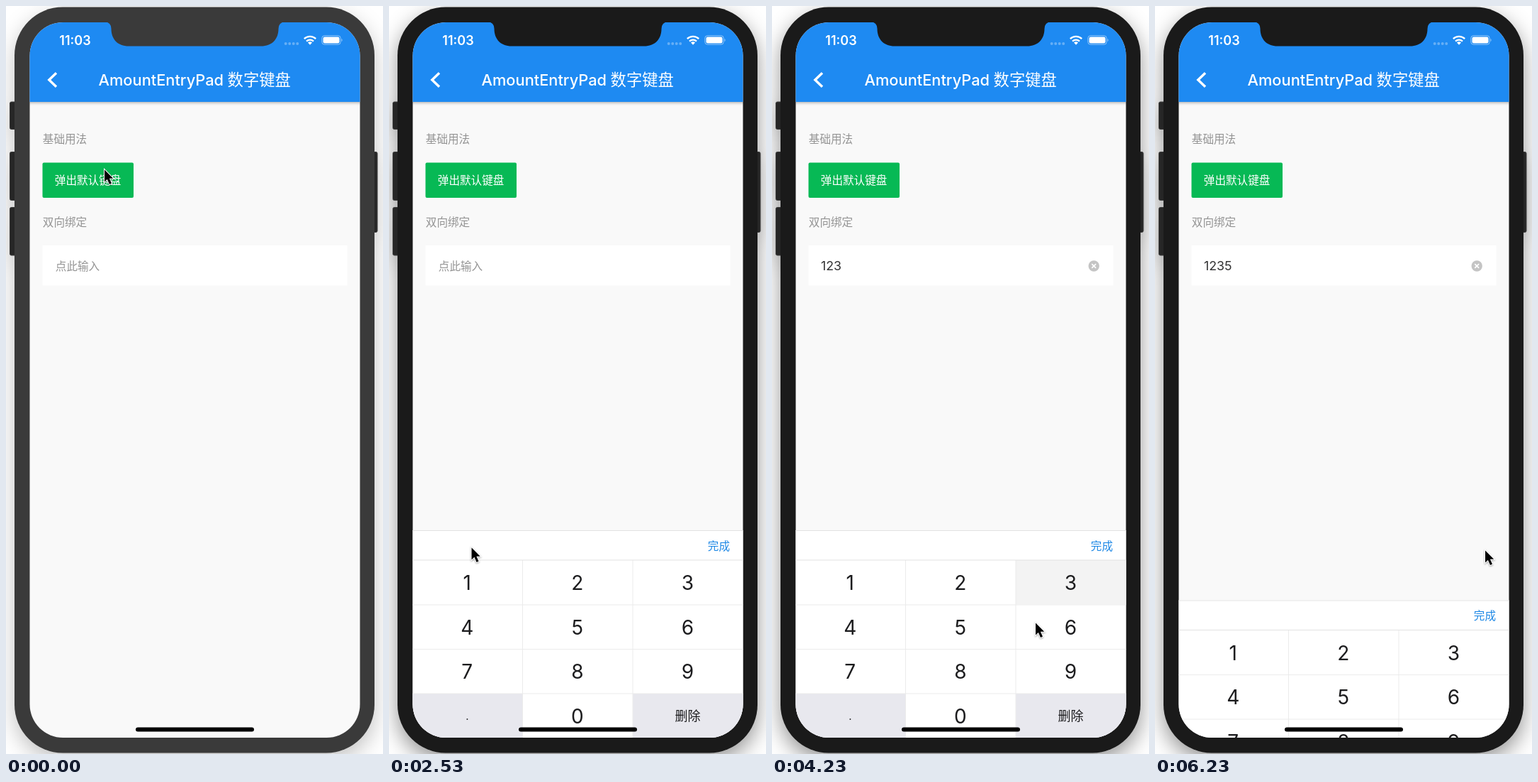
An HTML page that plays this animation: 532x1053 px, repeating every 6.26 s.

```html
<!DOCTYPE html>
<html lang="zh-CN">
<head>
<meta charset="utf-8">
<title>Number pad demo</title>
<style>
  html, body { margin: 0; width: 100%; height: 100%; overflow: hidden; background: #fff; }
  svg { display: block; width: 532px; height: 1053px; }
  text { font-family: Inter, "Noto Sans CJK SC", "Noto Sans CJK", sans-serif; }
  #phone { --body: #3a3a3a; --shade: rgba(0, 0, 0, .24); }
  #phone.active { --body: #1a1a1a; --shade: rgba(0, 0, 0, .42); }
  #shell { filter: drop-shadow(0 11px 15px var(--shade)); }
  .body { fill: var(--body); }
  .side { fill: #262626; stroke: #3c3c3c; }
  .bar { fill: #1e8af2; filter: drop-shadow(0 1px 2px rgba(0, 0, 0, .35)); }
  .cn { font-size: 15.6px; }
  .gray { fill: #939393; }
  .digit { font-size: 28px; fill: #1c1c1e; text-anchor: middle; }
  .line { stroke: #ebebeb; fill: none; }
  #cursor { filter: drop-shadow(0 1.5px 1.2px rgba(0, 0, 0, .35)); }
</style>
</head>
<body>
<svg viewBox="0 0 532 1053" xmlns="http://www.w3.org/2000/svg">
  <defs>
    <clipPath id="screen"><rect x="33.5" y="23" width="466" height="1007" rx="47"/></clipPath>
  </defs>
  <g id="phone">
    <g id="shell">
      <g class="side">
        <rect x="5.5" y="135" width="9" height="38.5" rx="2"/>
        <rect x="5.5" y="205.5" width="9" height="68" rx="2"/>
        <rect x="5.5" y="283.5" width="9" height="67.5" rx="2"/>
        <rect x="516" y="205.5" width="8" height="113" rx="2"/>
      </g>
      <rect class="body" x="12" y="1.5" width="508" height="1050" rx="68"/>
    </g>

    <g clip-path="url(#screen)">
      <rect x="33" y="23" width="467" height="1008" fill="#f9f9f9"/>
      <rect class="bar" x="28" y="18" width="477" height="117"/>

      <g fill="#fff">
        <text x="97.5" y="54.5" font-size="18" font-weight="600" text-anchor="middle">11:03</text>
        <g opacity=".32">
          <circle cx="394.7" cy="53" r="2"/><circle cx="400.2" cy="53" r="2"/>
          <circle cx="405.7" cy="53" r="2"/><circle cx="411.2" cy="53" r="2"/>
        </g>
        <path d="M429 54.8l-3-3.2a4.4 4.4 0 0 1 6 0z"/>
        <g fill="none" stroke="#fff" stroke-width="2.3">
          <path d="M424 49.7a7.3 7.3 0 0 1 10 0"/>
          <path d="M420.8 46.2a11.8 11.8 0 0 1 16.4 0"/>
        </g>
        <rect x="445.8" y="41.8" width="26.4" height="12.4" rx="3.6" fill="none" stroke="#fff" stroke-opacity=".5"/>
        <rect x="447.5" y="43.5" width="23" height="9" rx="2.2"/>
        <path d="M473.5 46a2.3 2.3 0 0 1 0 4z" opacity=".5"/>
        <path d="M71 94.2L60.8 104 71 113.8" fill="none" stroke="#fff" stroke-width="3.4"/>
        <g font-size="21.8" font-weight="500">
          <text x="307" y="111.5" text-anchor="end">AmountEntryPad</text>
          <text x="312.6" y="112" font-size="22.3">数字键盘</text>
        </g>
      </g>

      <g class="cn">
        <text class="gray" x="51.8" y="193">基础用法</text>
        <rect x="51.5" y="220.5" width="128.5" height="49.5" rx="2" fill="#07b955"/>
        <text x="68.8" y="251.3" fill="#fff">弹出默认键盘</text>
        <text class="gray" x="51.8" y="310">双向绑定</text>
        <rect x="51.5" y="337" width="430" height="56.5" fill="#fff"/>
        <text class="gray" id="hint" x="69.8" y="372">点此输入</text>
      </g>
      <text id="value" x="69" y="371.8" font-size="17.8" fill="#323233"></text>
      <g id="clear">
        <circle cx="454.2" cy="366" r="7.7" fill="#c4c4c4"/>
        <path d="M451.3 363.1l5.8 5.8m0-5.8l-5.8 5.8" stroke="#fff" stroke-width="1.6"/>
      </g>

      <g id="pad">
        <rect x="33" y="738" width="467" height="293" fill="#fff"/>
        <text class="cn" x="449.8" y="765.5" fill="#1e88e5">完成</text>
        <g fill="#e8e8ee">
          <rect x="33" y="968" width="155.5" height="63"/>
          <rect x="344" y="968" width="156" height="63"/>
        </g>
        <g id="keys"></g>
        <path class="line" d="M33 843H500M33 905.5H500M33 968H500M188.5 780V1031M344 780V1031"/>
        <path class="line" style="stroke:#e2e2e2" d="M33 738.5H500M33 780H500"/>
        <text x="110.3" y="1005" font-size="15" text-anchor="middle" fill="#1c1c1e">.</text>
        <text x="421.6" y="1006" font-size="18" text-anchor="middle" fill="#1c1c1e">删除</text>
      </g>
      <rect x="183" y="1015.5" width="167" height="6" rx="3"/>
    </g>
    <path class="body" d="M139 22Q148.500 23 148.500 32C148.500 47 158 56.500 173 56.500H360C375 56.500 384.500 47 384.500 32Q384.500 23 394 22Z"/>
  </g>
  <path id="cursor" d="M1 1.500V18.500L4.900 14.900 8 22 11 20.700 7.900 13.800H13.200Z"
        stroke="#fff" stroke-width="2" paint-order="stroke"/>
</svg>
<script>
  const LOOP = 6260;
  const PAD_HEIGHT = 293;
  const FOCUS = 1540;
  const OPEN = [1580, 1840];
  const CLOSE = [6115, 6315];
  const PRESSES = [[3020, 1], [3480, 2], [4060, 3], [4560, 5]];
  const TYPE_DELAY = 25;

  // time, x, y of the pointer tip
  const PATH = [
    [0, 138, 229], [350, 138, 231], [1130, 134, 307], [1450, 144, 351],
    [1960, 144, 351], [2680, 112, 812], [3000, 114, 814], [3170, 242, 818],
    [3600, 248, 820], [3900, 400, 816], [4110, 402, 818], [4230, 371, 867],
    [4470, 268, 866], [4680, 268, 868], [5000, 431, 954], [5130, 433, 963],
    [5300, 433, 963], [5880, 465, 765], [LOOP, 465, 765]
  ];

  const $ = id => document.getElementById(id);
  const clamp = v => Math.max(0, Math.min(1, v));
  const part = (t, [a, b]) => clamp((t - a) / (b - a));
  const smooth = k => k * k * (3 - 2 * k);

  function make(tag, attrs, parent) {
    const el = document.createElementNS("http://www.w3.org/2000/svg", tag);
    for (const name in attrs) el.setAttribute(name, attrs[name]);
    return parent.appendChild(el);
  }

  const COLS = [33, 188.5, 344, 500];
  const lights = {};
  for (const n of [1, 2, 3, 4, 5, 6, 7, 8, 9, 0]) {
    const col = n ? (n - 1) % 3 : 1;
    const row = n ? Math.floor((n - 1) / 3) : 3;
    const top = 780 + row * 62.6;
    lights[n] = make("rect", {
      x: COLS[col], y: top, width: COLS[col + 1] - COLS[col], height: 62.6,
      fill: "#f3f3f3", opacity: 0
    }, $("keys"));
    make("text", { class: "digit", x: 110.3 + col * 155.6, y: top + 42 }, $("keys")).textContent = n;
  }

  function pointer(t) {
    const i = Math.max(1, PATH.findIndex(p => p[0] > t));
    const [t0, x0, y0] = PATH[i - 1];
    const [t1, x1, y1] = PATH[i];
    const k = smooth((t - t0) / (t1 - t0));
    return [x0 + (x1 - x0) * k, y0 + (y1 - y0) * k];
  }

  function draw(t) {
    $("phone").classList.toggle("active", t >= FOCUS);

    const hidden = (1 - part(t, OPEN)) ** 3 + part(t, CLOSE) ** 2;
    $("pad").setAttribute("transform", `translate(0 ${hidden * PAD_HEIGHT})`);

    for (const [start, n] of PRESSES) {
      const glow = part(t, [start, start + 60]) * (1 - part(t, [start + 250, start + 350]));
      lights[n].setAttribute("opacity", glow);
    }

    const typed = PRESSES.filter(p => t >= p[0] + TYPE_DELAY).map(p => p[1]).join("");
    $("value").textContent = typed;
    $("clear").setAttribute("visibility", typed ? "visible" : "hidden");
    const first = PRESSES[0][0] + TYPE_DELAY;
    $("hint").setAttribute("opacity", 1 - part(t, [first, first + 185]));

    $("cursor").setAttribute("transform", `translate(${pointer(t)})`);
  }

  function tick() {
    draw(performance.now() % LOOP);
    requestAnimationFrame(tick);
  }
  tick();
</script>
</body>
</html>
```
